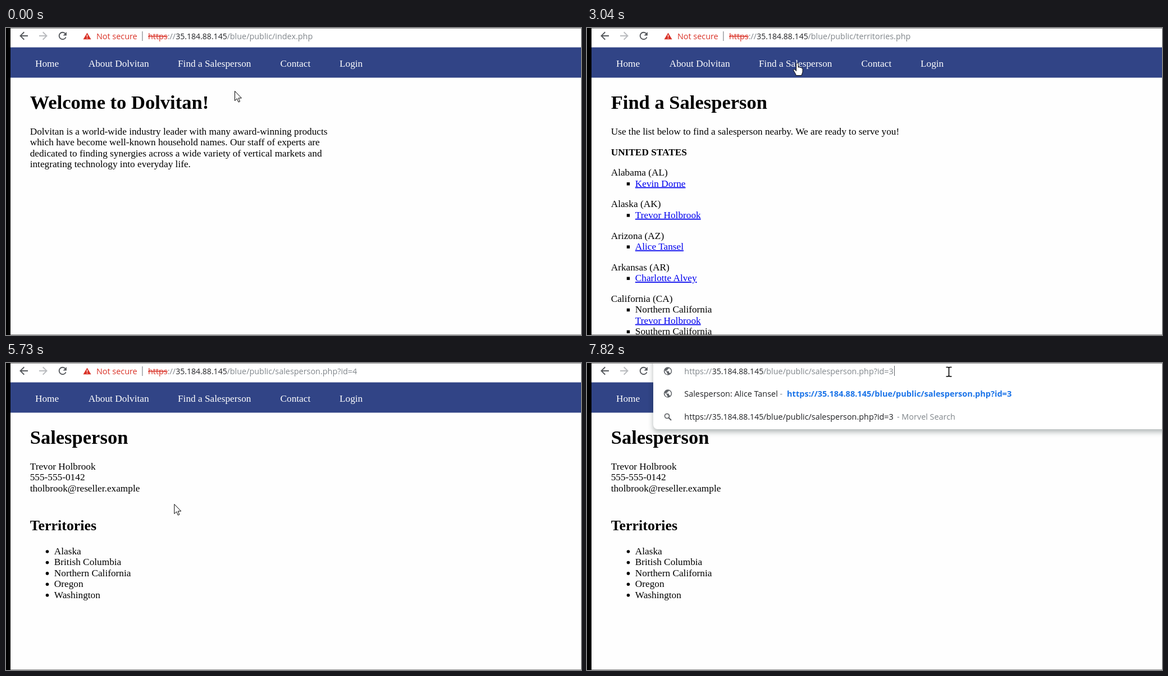
An HTML page for the animation above (8 s loop, 1024x547 px).

```html
<!DOCTYPE html>
<html lang="en">
<head>
<meta charset="utf-8">
<title>Browser session</title>
<style>
  html, body { margin: 0; height: 100%; overflow: hidden; background: #fefefe; }
  svg { display: block; width: 100vw; height: 100vh; }
  text { font: 17.28px "Liberation Serif", "Times New Roman", serif; white-space: pre; }
  .h1 { font-size: 34.56px; font-weight: bold; }
  .h2 { font-size: 25.92px; font-weight: bold; }
  .b { font-weight: bold; }
  .nav { fill: #fff; }
  .link { fill: #00e; text-decoration: underline; }
  .ui { font: 14.4px "Open Sans", "Noto Sans", sans-serif; fill: #202124; }
  .host { font-size: 14.05px; }
  .grey { fill: #80868b; }
  .red { fill: #d93025; }
  .blue { fill: #1a73e8; }
  .hit { font-size: 14.55px; font-weight: bold; }
  .strike { text-decoration: line-through; }
  .sel { fill: #fff; }
  .popup { filter: drop-shadow(0 5px 5px rgba(0, 20, 20, .3)); }
  .icon { fill: none; stroke: #55585c; stroke-width: 1.9; }
  .cursor { fill: #fff; stroke: #000; stroke-width: 1; stroke-linejoin: round; }
</style>
</head>
<body>
<svg id="stage" viewBox="0 0 1024 547" preserveAspectRatio="none"></svg>
<script>
const LOOP = 8000, LINE = 19.44, LEFT = 42.7, INDENT = 85.8;
const HOST = '35.184.88.145', DIR = '/blue/public/';
const QUERY = DIR + 'salesperson.php?id=', FULL = 'https://' + HOST + QUERY;
const AGENT = 'Trevor Holbrook', COMPANY = 'Dolvitan';

const text = (x, y, s, cls = '') => `<text x="${x}" y="${y}" class="${cls}">${s}</text>`;
const ui = (x, y, s, cls = '') => text(x, y, s, 'ui ' + cls);
const rect = (x, y, w, h, fill, extra = '') =>
  `<rect x="${x}" y="${y}" width="${w}" height="${h}" fill="${fill}" ${extra}/>`;
const path = (d, cls, extra = '') => `<path d="${d}" class="${cls}" ${extra}/>`;
const lines = (x, y, list) => list.map((s, i) => text(x, y + i * LINE, s)).join('');

// Pages
const nav = rect(8, 34.5, 1016, 54, '#314486') +
  [[52, 'Home'], [146.7, 'About ' + COMPANY], [306, 'Find a Salesperson'], [488.5, 'Contact'], [594, 'Login']]
    .map(([x, s]) => text(x, 68.7, s, 'nav')).join('');
const heading = s => text(LEFT, 143.8, s, 'h1');
const square = y => rect(70.8, y - 7.6, 5.4, 5.4, '#000');

const home = heading(`Welcome to ${COMPANY}!`) + lines(LEFT, 189.8, [
  COMPANY + ' is a world-wide industry leader with many award-winning products',
  'which have become well-known household names. Our staff of experts are',
  'dedicated to finding synergies across a wide variety of vertical markets and',
  'integrating technology into everyday life.']);

const states = [['Alabama (AL)', 'Kevin Dorne'], ['Alaska (AK)', AGENT],
  ['Arizona (AZ)', 'Alice Tansel'], ['Arkansas (AR)', 'Charlotte Alvey']];
const list = heading('Find a Salesperson') +
  text(LEFT, 189.8, 'Use the list below to find a salesperson nearby. We are ready to serve you!') +
  text(LEFT, 226.5, 'UNITED STATES', 'b') +
  states.map(([state, name], i) => {
    const y = 263.2 + i * 56.16;
    return text(LEFT, y, state) + square(y + LINE) + text(INDENT, y + LINE, name, 'link');
  }).join('') +
  text(LEFT, 487.9, 'California (CA)') +
  square(507.3) + text(INDENT, 507.3, 'Northern California') +
  text(INDENT, 526.7, AGENT, 'link') +
  square(546.2) + text(INDENT, 546.2, 'Southern California');

const areas = ['Alaska', 'British Columbia', 'Northern California', 'Oregon', 'Washington'];
const person = heading('Salesperson') +
  lines(LEFT, 189.8, [AGENT, '555-555-0142', 'tholbrook@reseller.example']) +
  text(LEFT, 298, 'Territories', 'h2') + lines(INDENT, 340.9, areas) +
  areas.map((_, i) => `<circle cx="73.5" cy="${336 + i * LINE}" r="2.8"/>`).join('');

// Toolbar
const arrows = path('M39 14H26M32.3 7.3 25.5 14l6.8 6.7', 'icon') +
  path('M59 14H72M65.7 7.3 72.5 14l-6.8 6.7', 'icon', 'style="stroke:#b9bbbe"');
const reload = path('M105.6 10A6.2 6.2 0 1 0 106.6 16.3', 'icon') +
  path('M107.9 7v6.4h-6.4z', '', 'fill="#55585c"');
const stop = path('M95 8.3 106.4 19.7M106.4 8.3 95 19.7', 'icon');
const chip = path('M144.5 8.5 151.5 20.3h-14z', 'red') +
  path('M144.5 12.3v3.8M144.5 17.2v1.6', '', 'stroke="#fff" stroke-width="1.4"') +
  ui(161, 20, 'Not secure', 'red') + rect(242.3, 6, 1.2, 17, '#80868b');
const globe = y => `<circle cx="144" cy="${y}" r="7.2" fill="#5f6368"/>` +
  path(`M138.6 ${y - 1.5}l3.6 3.6v1.2l1.2 1v1.8c-3-.4-5.4-3.6-4.8-7.6z` +
    `M146 ${y - 5.2}c4 1.6 4.8 6 2.3 9l-1.7-1h-.6v-2l-.9-.8h-3.8v-1.6h1.6l.7-.8v-1.4h1.3z`, '', 'fill="#fff"');
const lens = y => `<circle cx="142.5" cy="${y - 1.5}" r="4" class="icon" style="stroke-width:1.6"/>` +
  path(`M145.5 ${y + 1.5}l4.5 4.5`, 'icon');

function secureUrl(page, allSelected) {
  const c = s => allSelected ? 'sel' : s;
  return (allSelected ? rect(253, 3, 374.5, 24, '#0078d7') : '') +
    ui(253, 20, 'https', c('red') + ' strike') + ui(287.7, 20, '://', c('grey')) +
    ui(302.2, 20, HOST, c('') + ' host') + ui(393.5, 20, page, c('grey'));
}
const typedUrl = (id, caret) => globe(14.5) + ui(173.3, 20, 'https://', 'grey') +
  ui(222.7, 20, HOST, 'host') + ui(314, 20, QUERY + id, 'grey') + rect(caret, 5, 1, 18, '#5f6368');
const pill = (fill, stroke) =>
  rect(124.5, 0.5, 950, 28.5, fill, `rx="14.2" stroke="${stroke}" stroke-width="2"`);

// Suggestions
const visit = (i, name, x, id, boldId) => {
  const y = 60 + i * 41;
  return globe(y - 5.5) + (name ? ui(173.3, y, `Salesperson: ${name} <tspan class="grey">-</tspan>`) : '') +
    ui(x, y, FULL + (boldId ? id : ''), 'blue hit') + (boldId ? '' : ui(x + 393.3, y, id, 'blue'));
};
const search = (i, id, x) => {
  const y = 60 + i * 41;
  return lens(y - 5) + ui(173.3, y, 'https://') + ui(222.7, y, HOST, 'host') + ui(314, y, QUERY + id) +
    ui(x, y, '- Morvel Search', 'grey');
};
const popup = (rows, opacity, body) => `<g opacity="${opacity}">` +
  rect(118, -20, 940, 54 + rows * 41 + 2, '#fff', 'rx="8" class="popup"') + body + '</g>';
const many = visit(0, '', 173.3, '') + visit(1, AGENT, 386.7, 4) + visit(2, 'Alice Tansel', 356, 3) +
  visit(3, 'Annette Tolberry', 386.7, 9) + visit(4, '', 173.3, 2) + search(5, '', 544);
const few = visit(0, 'Alice Tansel', 356, 3, true) + search(1, 3, 552);

// Pointer
const shapes = {
  arrow: 'M.5 .5V17.5L4.4 13.8 7 20 9.5 19 7 12.9H12.4Z',
  hand: 'M-1.9 1.8C-1.9-.6 1.7-.6 1.7 1.8V8C2.3 6.6 5 6.9 5.1 8.6 5.9 7.4 8 8 8.1 9.6 9.2 9 9.6 10 9.6 11.2' +
    'V15C9.6 18 8 19 7.6 22.3H-2.2C-2.4 19.5-5 17-6.6 13.4-7.4 11.4-5.2 10.6-3.8 12.2L-1.9 14.2Z',
  beam: 'M-5 0h3.5l1.5 1 1.5-1H5M0 1V15.5M-5 16.5h3.5l1.5-1 1.5 1H5'
};
// start, end, number of steps, destination
const moves = [
  [150, 670, 4, 390, 101], [950, 1660, 5, 374, 72], [2060, 2210, 2, 374.5, 62.3],
  [3470, 4470, 8, 184.3, 332.3], [5460, 6160, 6, 644.5, 7.5]];

function pointer(t) {
  let x = 407, y = 112;
  for (const [start, end, n, toX, toY] of moves) {
    if (t < start) break;
    const k = Math.min(n, 1 + Math.floor((t - start) / (end - start) * (n - 1) + 1e-6));
    const e = (1 - Math.cos(Math.PI * k / n)) / 2;
    x += (toX - x) * e;
    y += (toY - y) * e;
  }
  const kind = t >= 6160 ? 'beam' : t >= 2060 && t < 3612 || t >= 4327 && t < 5460 ? 'hand' : 'arrow';
  const style = kind === 'beam' ? 'style="fill:none;stroke-width:1.6"' : '';
  return path(shapes[kind], 'cursor', `transform="translate(${x.toFixed(1)} ${y.toFixed(1)})" ${style}`);
}

function address(t) {
  if (t >= 7820) return popup(2, 1, few) + typedUrl(3, 547);
  if (t >= 7580) return popup(6, t < 7700 ? .14 : 1, many) + typedUrl('', 539);
  if (t >= 6560) return pill('#fff', '#a9c7fa') + chip + secureUrl(QUERY) +
    rect(618.5, 3, 9, 24, '#0078d7') + ui(618.7, 20, 4, 'sel');
  if (t >= 6440) return pill('#fff', '#a9c7fa') + chip + secureUrl(QUERY + 4, true);
  const page = t < 2750 ? DIR + 'index.php' : t < 5180 ? DIR + 'territories.php' : QUERY + 4;
  return (t >= 6160 ? pill('#f6f7f8', 'none') : '') + chip + secureUrl(page);
}

function scene(t) {
  const loading = t >= 2610 && t < 3040 || t >= 5030 && t < 5180;
  return rect(0, 0, 1024, 547, '#fefefe') + rect(8, 0, 1016, 35, '#fff') + nav +
    (t < 2750 ? home : t < 5180 ? list : person) +
    arrows + (loading ? stop : reload) + address(t) +
    rect(8, 0, 1016, 1, '#8c8c8c') + rect(8, 546, 1016, 1, '#8c8c8c') +
    rect(0, 0, 8, 547, '#000') + pointer(t);
}

const stage = document.getElementById('stage');
const begin = performance.now();
let shown = '';
function draw() {
  const next = scene((performance.now() - begin) % LOOP);
  if (next !== shown) stage.innerHTML = shown = next;
  requestAnimationFrame(draw);
}
draw();
</script>
</body>
</html>
```
